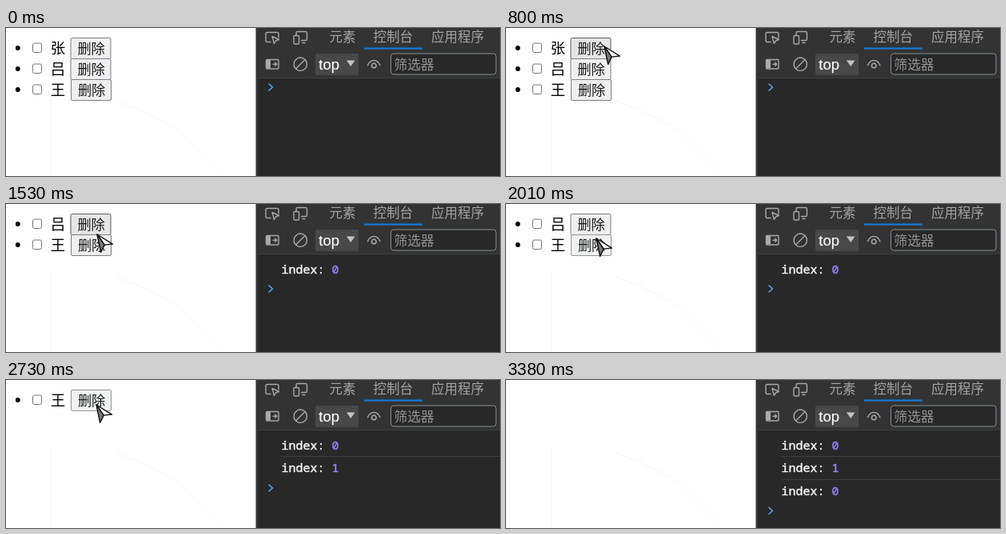
An HTML page for the animation above (4180 ms loop, 618 px wide and 185 px high).

```html
<!DOCTYPE html>
<html lang="zh-CN">
<head>
<meta charset="utf-8">
<title>列表删除</title>
<style>
html, body { margin: 0; width: 100%; height: 100%; overflow: hidden; background: #fefefe; }
svg { display: block; width: 618px; height: 185px; }
text { font-family: "Noto Sans CJK SC", "Noto Sans CJK", "Noto Sans", sans-serif; white-space: pre; }
.name { font-size: 18.4px; }
.label { font-size: 17.2px; fill: #1a1a1a; }
.tab { font-size: 16.5px; fill: #a3a3a3; }
.log { font: 500 15px "Noto Sans Mono", "DejaVu Sans Mono", monospace; fill: #f4f4f4; stroke: #f4f4f4; stroke-width: .45; }
.num { fill: #9980ff; stroke: #9980ff; }
.icon { fill: none; stroke: #a8a8a8; stroke-width: 1.4; stroke-linejoin: round; stroke-linecap: round; }
</style>
</head>
<body>
<svg viewBox="0 0 618 185">
  <rect width="618" height="185" fill="#fefefe"/>
  <g fill="none">
    <path d="M56.500 85V185" stroke="#faf5ea"/>
    <path d="M137 91L168 103Q192 114 214 127L271 185" stroke="#f6f6f6"/>
  </g>
  <g id="list"></g>

  <rect x="312" width="1" height="185" fill="#999"/>
  <rect x="313" width="305" height="185" fill="#333"/>
  <rect x="315.5" y="63" width="302.5" height="122" fill="#282828"/>
  <path d="M315.5 62.5H618" stroke="#404040"/>

  <g class="icon">
    <path d="M331 17.500H327Q325 17.500 325 15.500V7.500Q325 5.500 327 5.500H339Q341 5.500 341 7.500V12"/>
    <path d="M333 10.500L341.500 14.500L337.500 15.800L335.500 19.500Z"/>
    <path d="M363 9V6Q363 4.500 364.500 4.500H375Q376.500 4.500 376.500 6V14Q376.500 15.500 375 15.500H369.500M371 18.500H374"/>
    <rect x="360" y="9.500" width="6.500" height="10.500" rx="1.200"/>
    <rect x="325.500" y="39.500" width="15.500" height="11.500" rx="1"/>
    <path d="M334 45.300H338.500M336.700 43.300L338.700 45.300L336.700 47.300"/>
    <circle cx="368.300" cy="45.200" r="8.200"/>
    <path d="M362.500 51L374.100 39.400"/>
    <path d="M452.500 46.700Q455 40.500 460.300 40.500T468 46.700"/>
    <circle cx="460.300" cy="47" r="2.800"/>
  </g>
  <rect x="326" y="40" width="5" height="10.500" fill="#a8a8a8"/>

  <text class="tab" x="404.500" y="16.700">元素</text>
  <text class="tab" x="459.500" y="16.700">控制台</text>
  <text class="tab" x="532" y="16.700">应用程序</text>
  <rect x="448" y="24.400" width="73" height="2.300" fill="#1a76cf"/>

  <rect x="387" y="32" width="54" height="27" rx="2" fill="#484848"/>
  <text x="391.300" y="51.500" fill="#f4f4f4" stroke="#f4f4f4" stroke-width=".25" style="font:18.5px 'Liberation Sans',Arial,sans-serif">top</text>
  <path d="M426 40.500H436.500L431.250 48Z" fill="#c4c4c4"/>
  <rect x="481.500" y="32" width="131.500" height="26" rx="3.500" fill="#282828" stroke="#838f95"/>
  <text x="485.500" y="52.300" font-size="16.700" fill="#929292">筛选器</text>

  <g id="logs"></g>
  <path id="prompt" d="M328.500 -4.500L333.300 0L328.500 4.500" fill="none" stroke="#5b9de0" stroke-width="1.700"/>

  <g id="cursor" stroke="#111" stroke-width="1.400" stroke-linejoin="round">
    <path d="M0 0L9 21L0 16Z" fill="#fff"/>
    <path d="M0 0L-9 21L0 16Z" fill="#777"/>
  </g>
</svg>
<script>
const LOOP = 4180, STEP = 80, ROW = 26, TOP = 13;
const SHOW = 320, HIDE = 3380, TILT = -35;

const rows = [
  { name: '张', x: 81, gone: 1210 },
  { name: '吕', x: 81, gone: 2090 },
  { name: '王', x: 81.5, gone: 2810 }
];
const logs = [
  { at: 1210, value: 0, y: 86.5 },
  { at: 2090, value: 1, y: 114.5 },
  { at: 2810, value: 0, y: 143.5 }
];
const promptY = [74, 106, 135, 163.5];
const presses = [[1130, 1210], [2010, 2090], [2650, 2810]];

// Pointer moves: start time, steps, end point and optional bend point
const moves = [
  { at: 400, steps: 6, to: [123, 23], bend: [180, 70] },
  { at: 1370, steps: 3, to: [114, 38] },
  { at: 1690, steps: 3, to: [113, 43] },
  { at: 2330, steps: 3, to: [113, 31] },
  { at: 3130, steps: 3, to: [160, 126], bend: [118, 80] }
];

const byId = id => document.getElementById(id);

function add(parent, tag, attrs, text = '') {
  const node = document.createElementNS('http://www.w3.org/2000/svg', tag);
  for (const key in attrs) node.setAttribute(key, attrs[key]);
  node.textContent = text;
  return parent.appendChild(node);
}

for (const row of rows) {
  const g = row.node = add(byId('list'), 'g', {});
  add(g, 'circle', { cx: 14.8, cy: 12, r: 2.9 });
  add(g, 'rect', { x: 33.5, y: 6, width: 11, height: 11.5, rx: 2, fill: '#fff', stroke: '#767676' });
  add(g, 'text', { x: 55.8, y: 18.8, class: 'name' }, row.name);
  row.button = add(g, 'rect', { x: row.x, y: -0.5, width: 50, height: 26, rx: 1.5 });
  add(g, 'text', { x: row.x + 8.4, y: 18.7, class: 'label' }, '删除');
}

logs.forEach((log, i) => {
  const g = log.node = add(byId('logs'), 'g', {});
  if (i) add(g, 'path', { d: `M344 ${log.y - 19}H618`, stroke: '#3f3f3f' });
  const line = add(g, 'text', { x: 344.5, y: log.y, class: 'log' }, 'index: ');
  add(line, 'tspan', { class: 'num' }, log.value);
});

function pointerAt(t) {
  let pos = [177, 175], angle = 0;
  for (const { at, steps, to, bend } of moves) {
    if (t < at) break;
    const done = Math.min(steps, Math.floor((t - at) / STEP) + 1) / steps;
    const u = 1 - (1 - done) ** 1.4, v = 1 - u;
    pos = pos.map((from, i) => {
      const mid = bend ? bend[i] : (from + to[i]) / 2;
      return v * v * from + 2 * u * v * mid + u * u * to[i];
    });
    angle += (TILT - angle) * u;
  }
  return { x: pos[0], y: pos[1], angle };
}

function buttonLook(hover, pressed) {
  if (hover && pressed) return ['#f0f2f2', '#949494'];
  return hover ? ['#e5e5e5', '#5c5c5c'] : ['#efefef', '#7b8082'];
}

function render(t) {
  const p = pointerAt(t);
  const visible = t >= SHOW && t < HIDE;
  const pressed = presses.some(([a, b]) => t >= a && t < b);
  byId('cursor').setAttribute('transform', `translate(${p.x} ${p.y}) rotate(${p.angle})`);
  byId('cursor').style.display = visible ? '' : 'none';

  let y = TOP;
  for (const row of rows) {
    const present = t < row.gone;
    row.node.style.display = present ? '' : 'none';
    if (!present) continue;
    const hover = visible && p.x >= row.x && p.x <= row.x + 50 && p.y >= y && p.y < y + ROW;
    const [fill, stroke] = buttonLook(hover, pressed);
    row.button.setAttribute('fill', fill);
    row.button.setAttribute('stroke', stroke);
    row.node.setAttribute('transform', `translate(0 ${y})`);
    y += ROW;
  }

  let count = 0;
  for (const log of logs) {
    const shown = t >= log.at;
    log.node.style.display = shown ? '' : 'none';
    count += shown;
  }
  byId('prompt').setAttribute('transform', `translate(0 ${promptY[count]})`);
}

const start = performance.now();
function tick() {
  render((performance.now() - start) % LOOP);
  requestAnimationFrame(tick);
}
tick();
</script>
</body>
</html>
```
